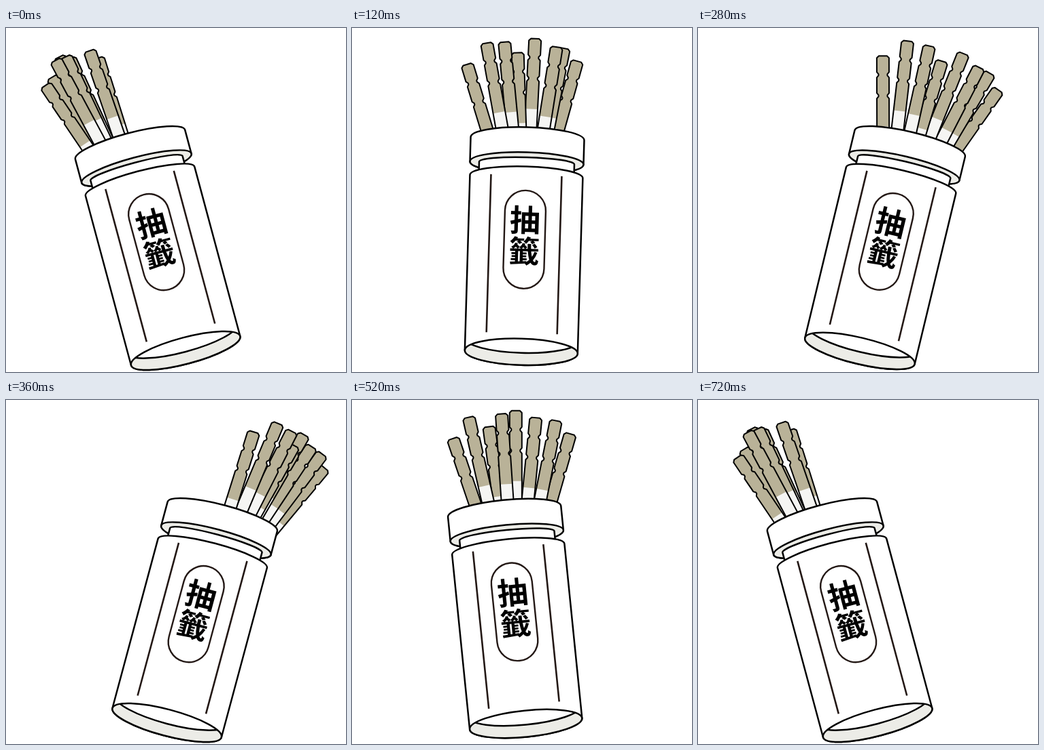
An HTML page with a canvas for the animation above (0.76 s loop, 500 px wide and 508 px high).

```html
<!DOCTYPE html>
<html lang="zh-Hant">
<head>
<meta charset="utf-8">
<style>
  html, body { margin: 0; width: 100%; height: 100%; overflow: hidden; background: #fff; }
  canvas { display: block; width: 500px; height: 508px; }
</style>
</head>
<body>
<canvas id="stage"></canvas>
<script>
const LOOP = 760, STEP = 40, SWING = 360, TILT = 15;
const INK = '#000', BROWN = '#231815', WOOD = '#b9b298', PALE = '#f5f5f3', RIM = '#ecece7';

const canvas = document.getElementById('stage');
const ctx = canvas.getContext('2d');
const dpr = window.devicePixelRatio || 1;
canvas.width = 500 * dpr;
canvas.height = 508 * dpr;

// Stick lengths from the shared pivot, and sideways offset of each tip at the key times.
const KEY_TIMES = [0, 120, 200, 360, 440, 600, 720];
const PIVOT_Y = -95, THROW = 11;
const STICKS = [
  { reach: 289, tips: [-94, -92, -95, 12, -32, -88] },
  { reach: 313, tips: [-71, -64, -65, 42, -4, -63] },
  { reach: 311, tips: [-56, -38, -29, 64, 44, -14] },
  { reach: 294, tips: [-82, -18, -1, 72, 23, -34] },
  { reach: 315, tips: [-65, 7, 33, 82, 46, 21] },
  { reach: 306, tips: [-51, 39, 64, 97, 68, 54] },
  { reach: 306, tips: [-21, 50, 81, 114, 97, 83] },
  { reach: 292, tips: [-12, 70, 102, 122, 112, 105] }
];

const easeIn = u => u * u;
const settle = u => (1 - (1 - u / 2) ** 2) / 0.75;
const mix = (a, b, u) => a + (b - a) * u;

function cupAngle(t) {
  const u = (t % SWING) / SWING;
  const side = t < SWING ? 1 : -1;
  return side * (-TILT + 2 * TILT * (1 - (1 - u) ** 2)) * Math.PI / 180;
}

// Sticks fan out quickly after each turn, then rush together before the next.
function stickPose({ reach, tips }, t) {
  let k = 0;
  while (t >= KEY_TIMES[k + 1]) k++;
  const u = (t - KEY_TIMES[k]) / (KEY_TIMES[k + 1] - KEY_TIMES[k]);
  const rushing = k % 3 === 2;
  const eased = rushing ? easeIn(u) : settle(u);
  const lift = rushing ? eased : k % 3 === 0 ? 1 - eased : 0;
  const offset = mix(tips[k], tips[(k + 1) % 6], eased);
  return { angle: Math.asin(offset / reach), reach: reach + THROW * lift };
}

function paint(path, fill, stroke, width = 2.5) {
  if (fill) { ctx.fillStyle = fill; ctx.fill(path); }
  if (stroke) { ctx.strokeStyle = stroke; ctx.lineWidth = width; ctx.stroke(path); }
}

function stickPath() {
  const half = 9, end = 160;
  const right = [[half - 3, 0], [half, 3]];
  for (const y of [28, 59]) right.push([half, y - 4], [half - 2.5, y - 1], [half - 2.5, y + 1], [half, y + 4]);
  right.push([half, end]);
  const left = right.map(([x, y]) => [-x, y]).reverse();
  const path = new Path2D();
  [...right, ...left].forEach(([x, y]) => path.lineTo(x, y));
  path.closePath();
  return path;
}

function ellipse(y, rx, ry) {
  const path = new Path2D();
  path.ellipse(0, y, rx, ry, 0, 0, 2 * Math.PI);
  return path;
}

// Cylinder side: domed top, straight walls, base curve bulging down by baseRy.
function cylinder(top, base, rx, topRy, baseRy) {
  const path = new Path2D();
  path.ellipse(0, top, rx, topRy, 0, Math.PI, 2 * Math.PI);
  path.ellipse(0, base, rx, baseRy, 0, 0, Math.PI);
  path.closePath();
  return path;
}

const STICK = stickPath();
const LID = cylinder(-262, -226, 83.5, 17, 16);
const LID_RIM = ellipse(-226, 83.5, 16);
const NECK = cylinder(-226, -208, 70, 8.5, 2);
const BODY = cylinder(-206, 53, 83, 15, 19.5);
const BASE = ellipse(53, 83, 19.5);
const HOLLOW = ellipse(35, 83, 19.5);
const PLATE = new Path2D();
PLATE.roundRect(-30, -185.5, 60, 145, 30);
const STRIPES = new Path2D();
for (const x of [-52, 52]) {
  STRIPES.moveTo(x, -208);
  STRIPES.lineTo(x, 25.5);
}

function drawStick(stick, t) {
  const { angle, reach } = stickPose(stick, t);
  ctx.save();
  ctx.translate(0, PIVOT_Y);
  ctx.rotate(angle);
  ctx.translate(0, -reach);
  paint(STICK, WOOD);
  ctx.fillStyle = PALE;
  ctx.fillRect(-9, 104, 18, 56);
  paint(STICK, null, INK, 2);
  ctx.restore();
}

function drawGlyph(char, y) {
  const size = 45;
  ctx.font = `900 ${size}px "Noto Sans CJK TC", "Noto Sans CJK JP", "Noto Sans CJK", sans-serif`;
  ctx.textAlign = 'center';
  ctx.fillStyle = INK;
  ctx.fillText(char, 0, y + size * 0.38);
}

function drawCup() {
  paint(LID, '#fff', INK);
  paint(LID_RIM, RIM, INK);
  paint(NECK, '#fff', INK);
  paint(BODY, '#fff', INK);
  paint(BASE, RIM);
  ctx.save();
  ctx.clip(BASE);
  paint(HOLLOW, '#fff', INK);
  ctx.restore();
  paint(BASE, null, INK);
  paint(STRIPES, null, BROWN, 2.6);
  paint(PLATE, null, BROWN, 2.4);
  drawGlyph('抽', -142);
  drawGlyph('籤', -96);
}

function draw(now) {
  const t = Math.floor((now % LOOP) / STEP) * STEP % (2 * SWING);
  ctx.setTransform(dpr, 0, 0, dpr, 0, 0);
  ctx.fillStyle = '#fff';
  ctx.fillRect(0, 0, 500, 508);
  ctx.lineJoin = 'round';
  ctx.translate(250.4, 425.3);
  ctx.rotate(cupAngle(t));
  for (let i = STICKS.length - 1; i >= 0; i--) drawStick(STICKS[i], t);
  drawCup();
}

const start = performance.now();
function loop() {
  draw(performance.now() - start);
  requestAnimationFrame(loop);
}
loop();
</script>
</body>
</html>
```
